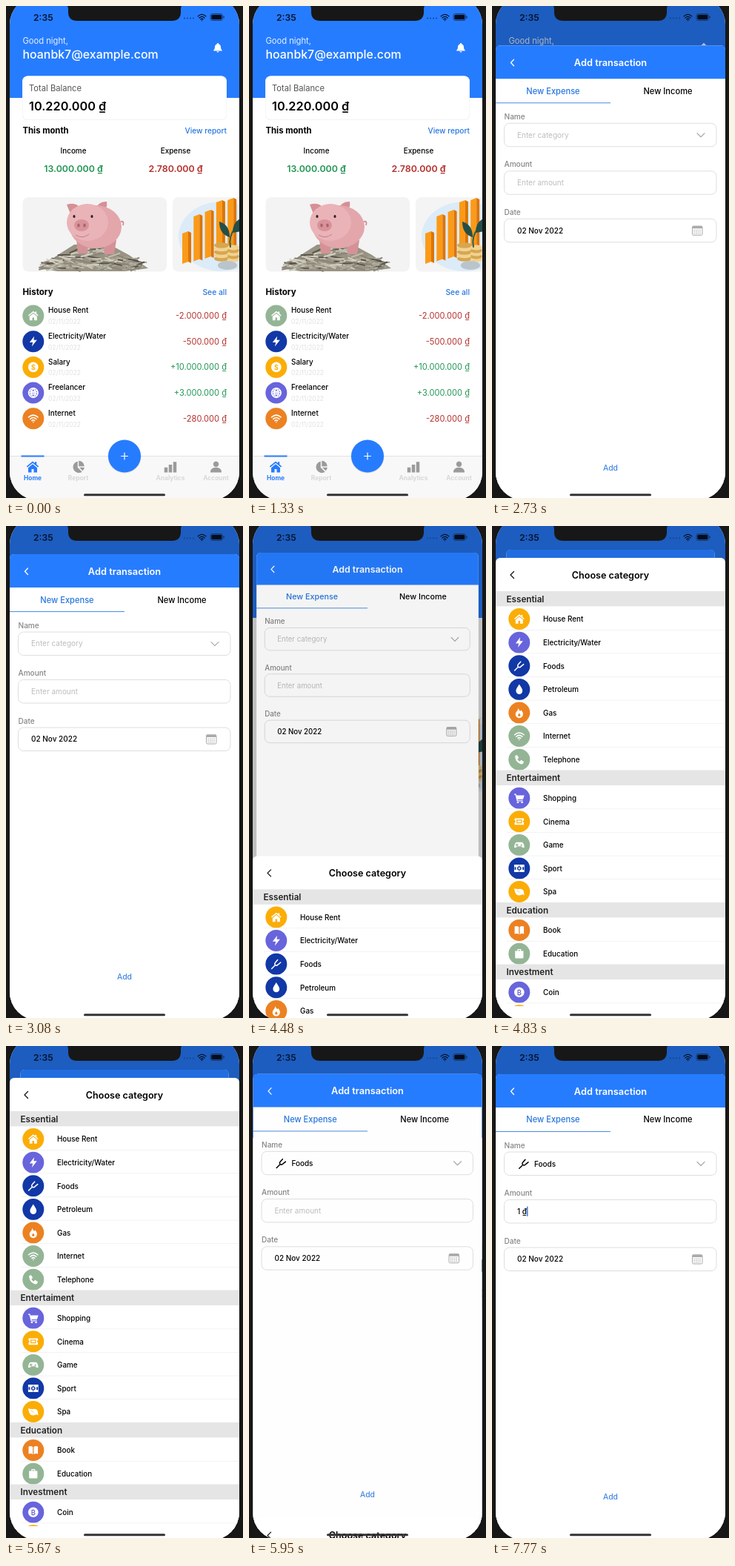
Write an HTML page that moves like this. It is 320 by 664 pixels and loops after 8000 ms.

```html
<!DOCTYPE html>
<html lang="en">
<head>
<meta charset="utf-8">
<style>
  html, body { margin: 0; width: 100%; height: 100%; overflow: hidden; background: #171717; }
  svg { display: block; width: 100vw; height: 100vh; font-family: Inter, Roboto, sans-serif; }
</style>
</head>
<body>
<svg id="stage" viewBox="0 0 320 664"></svg>
<script>
const BLUE = '#267cff', LINK = '#2675df', GREEN = '#219653', RED = '#b3302b';
const SAGE = '#94b595', NAVY = '#1138a6', YELLOW = '#fbad06', VIOLET = '#6864dc', ORANGE = '#ec8122';

// Icons on a 24-unit grid; names in STROKED are drawn as outlines.
const ICONS = {
  house: 'M12 2 1 11l1.500 1.800L12 5l9.500 7.800L23 11l-4-3.300V3h-3v2.200zM12 7 4 13.500V22h6v-6h4v6h6v-8.500z',
  bolt: 'M14 1 4 14h7l-2 9L20 9h-7z',
  fork: 'M2 22 10 14M15 3 10.500 8Q7 12 10 14Q13 16.500 16 13L21.500 8.500',
  drop: 'M12 1C8 8 5 11 5 15.500a7 7 0 0 0 14 0C19 11 16 8 12 1z',
  flame: 'M10 1c1 5 3 5 4 8l2-3c3 4 5 7 4 10a8 7.500 0 0 1-16 0C3 10 10 8 10 1zM12 13c-4 4-3 7 0 7s4-3 0-7z',
  wifi: 'M2 9Q12 0 22 9M5.500 13Q12 7 18.500 13M9 16.500Q12 14 15 16.500M12 19.500v.5',
  phone: 'M3 4 7 2l4 6-3 3q2 4 5 5l3-3 6 4-2 4q-3 3-10-2T3 4z',
  cart: 'M1 3h4l1 3h17l-3 9H8l1 2h11v2H7L3.500 5H1zM7 20h4v3H7zM16 20h4v3h-4z',
  ticket: 'M2 5h20v5a2 2 0 0 0 0 4v5H2v-5a2 2 0 0 0 0-4zM6 8v8h12V8zM8 10h8v4H8z',
  game: 'M6 6h12q4 2 5 10 0 4-5 1l-2-2H8l-2 2q-5 3-5-1Q2 8 6 6zM6 9v2H4v2h2v2h2v-2h2v-2H8V9zM15 11h3v3h-3z',
  sport: 'M1 4h22v16H1zM11.400 5v3a4 4 0 0 0 0 8v3h1.200v-3a4 4 0 0 0 0-8V5zM2 9v6h3V9zM19 9v6h3V9zM10 10h4v4h-4z',
  leaf: 'M1 5q6 2 12 1 9 0 9 8l1 6-3-2Q6 23 3 13q-1-4-2-8zM7 10l9 6-8-7z',
  book: 'M2 4q6-2 9 1v16q-4-3-9-1zM22 4q-6-2-9 1v16q4-3 9-1z',
  bag: 'M3 6h5V2h8v4h5v14q0 2-2 2H5q-2 0-2-2zM10 4v2h4V4z',
  globe: 'M12 2a10 10 0 1 0 .1 0M12 2Q2 12 12 22M12 2Q22 12 12 22M2 12h20M4 7q8 4 16 0M4 17q8-4 16 0',
  bell: 'M12 1q2 0 2 2 5 2 5 8 0 5 3 7v1H2v-1q3-2 3-7 0-6 5-8 0-2 2-2zM9 20h6q-3 5-6 0z',
  pie: 'M11 2v11l8 8A10.500 10.500 0 1 1 11 2zM13 1a10 10 0 0 1 10 10H13zM14 13h9q0 4-3 6z',
  bars: 'M1 13h6v9H1zM9 8h6v14H9zM17 3h6v19h-6z',
  person: 'M12 2a5 5 0 1 0 .1 0zM2 22q0-9 10-9t10 9z'
};
const STROKED = ['fork', 'wifi', 'globe'];

const rect = (x, y, w, h, fill, r = 0, extra = '') =>
  `<rect x="${x}" y="${y}" width="${w}" height="${h}" rx="${r}" fill="${fill}" ${extra}/>`;
const ellipse = (x, y, rx, ry, fill, extra = '') =>
  `<ellipse cx="${x}" cy="${y}" rx="${rx}" ry="${ry}" fill="${fill}" ${extra}/>`;
const path = (d, fill, extra = '') => `<path d="${d}" fill="${fill}" ${extra}/>`;
const line = (d, color, width = 1) =>
  path(d, 'none', `stroke="${color}" stroke-width="${width}" stroke-linecap="round" stroke-linejoin="round"`);
// Text is placed by the vertical centre of its capitals.
const text = (x, y, size, str, fill = '#000', weight = 400, anchor = 'start') =>
  `<text x="${x}" y="${y + size * .36}" font-size="${size}" font-weight="${weight}" fill="${fill}" text-anchor="${anchor}">${str}</text>`;
const group = (id, body) => `<g id="${id}">${body}</g>`;

function icon(name, x, y, size, color) {
  const body = STROKED.includes(name) ? line(ICONS[name], color, 2.4)
    : path(ICONS[name], color, 'fill-rule="evenodd"');
  return `<g transform="translate(${x} ${y}) scale(${size / 24}) translate(-12 -12)">${body}</g>`;
}
function badge(x, y, color, name) {
  const mark = name.length > 1 ? icon(name, x, y, 15, '#fff')
    : ellipse(x, y, 6.8, 6.8, '#fff') + text(x, y, 9.5, name, color, 600, 'middle');
  return ellipse(x, y, 14.5, 14.5, color) + mark;
}

function piggyBank() {
  let seed = 7, notes = '';
  const random = () => (seed = seed * 16807 % 2147483647) / 2147483647;
  const tones = ['#8a8577', '#d3cfc0', '#a9a595', '#57534a', '#c0bcad'];
  for (let i = 0; i < 130; i++) {
    const x = 52 + random() * 130, top = 322 + Math.abs(x - 115) * .36;
    const y = top + random() * (355 - top);
    notes += rect(x - 8, y - 1, 17, 2, tones[i % 5], 0, `transform="rotate(${random() * 50 - 25} ${x} ${y})"`);
  }
  return rect(22.5, 258, 194.5, 100.5, '#f3f3f3', 8) +
    path('M44 354 70 336 92 322H140L166 336 192 354 160 358H70z', '#989383') + notes +
    path('M95 314h16l-1 20H97zM131 316h18l-3 19h-13z', '#d49297') +
    path('M82 268q13-4 18 5l-12 10zM119 276q6-13 17-12 2 9-8 18z', '#d78f96') +
    ellipse(121, 298, 35, 29, '#e2a6ab') + ellipse(110, 292, 28, 25, '#eab3b7') +
    path('M155 291q5-1 3 5', 'none', 'stroke="#d78f96" stroke-width="2"') +
    ellipse(102, 296, 10, 8, '#d8939a') + ellipse(98, 296, 1.7, 2.5, '#a9616a') + ellipse(106, 296, 1.7, 2.5, '#a9616a') +
    ellipse(92, 284, 1.6, 2, '#2b2224') + ellipse(116, 284, 1.6, 2, '#2b2224') +
    path('M94 309q9 6 18-1', 'none', 'stroke="#c07f86"');
}

function growthChart() {
  let out = rect(225, 258, 194, 100.5, '#f4f4f4', 8) + ellipse(291, 311, 58, 47, '#dcebf8');
  // Slanted boxes on a baseline that rises to the right.
  [304, 281, 275, 262, 259].forEach((y, i) => {
    const x = 238 + i * 15.3, base = 347 - i * 3.5;
    out += path(`M${x} ${y + 3}l8-3V${base - 2}l-8 3z`, '#fb9a18') +
      path(`M${x + 8} ${y}l4 2V${base}l-4-2z`, '#dc7406');
  });
  for (let i = 0; i < 5; i++)
    out += ellipse(291, 341 - i * 4.5, 10, 3.8, i % 2 ? '#f1d38f' : '#d7a651') +
      ellipse(307, 342 - i * 4, 8, 3.4, i % 2 ? '#d7a651' : '#f1d38f');
  return out + line('M303 325Q300 311 310 299', '#315e54', 2) +
    path('M302 312q-14-4-14-21 14 4 14 21zM306 306q0-16 13-20v18z', '#244f48') +
    ellipse(299, 350, 13, 6, '#b9c4cb');
}

function home() {
  const history = [
    ['House Rent', '-2.000.000', SAGE, 'house'], ['Electricity/Water', '-500.000', NAVY, 'bolt'],
    ['Salary', '+10.000.000', YELLOW, '$'], ['Freelancer', '+3.000.000', VIOLET, 'globe'],
    ['Internet', '-280.000', ORANGE, 'wifi']];
  const tabs = [['Home', 36, 'house'], ['Report', 97.5, 'pie'], ['Analytics', 222, 'bars'], ['Account', 283.5, 'person']];
  return rect(0, 0, 320, 664, '#fff') + rect(0, 0, 320, 124, BLUE) +
    text(22.5, 47, 11.2, 'Good night,', '#e6f0ff') +
    text(22.5, 65, 15.9, 'hoanbk7@example.com', '#fff', 500) + icon('bell', 286, 56.5, 14, '#fff') +
    rect(22, 94.5, 276, 59.5, '#efefef', 7) + rect(22.5, 94.5, 275, 58.7, '#fff', 7) +
    text(31, 110.5, 11.2, 'Total Balance', '#555') + text(31, 135, 16.3, '10.220.000 ₫', '#000', 600) +
    text(22.5, 168, 11.3, 'This month', '#000', 700) + text(298, 168, 10.2, 'View report', LINK, 500, 'end') +
    text(91, 195, 9.9, 'Income', '#000', 500, 'middle') + text(229, 195, 9.9, 'Expense', '#000', 500, 'middle') +
    text(91, 219.5, 12.4, '13.000.000 ₫', GREEN, 600, 'middle') + text(229, 219.5, 12.4, '2.780.000 ₫', RED, 600, 'middle') +
    piggyBank() + growthChart() +
    text(22.5, 386, 11.5, 'History', '#000', 700) + text(298, 386, 10.3, 'See all', LINK, 500, 'end') +
    history.map(([name, sum, color, mark], i) => {
      const y = 418 + i * 34.7;
      return badge(36.8, y, color, mark) + text(57, y - 7.2, 9.9, name, '#000', 500) +
        text(57, y + 8, 8.4, '02/11/2022', '#e0e0e0') +
        text(298, y, 11.1, sum + ' ₫', sum[0] === '+' ? GREEN : RED, 400, 'end');
    }).join('') +
    rect(0, 607, 320, 57, '#f8f8f8') + rect(0, 607, 320, .7, '#d9d9d9') + rect(20.5, 606.5, 31, 2, BLUE) +
    tabs.map(([name, x, mark], i) => icon(mark, x, 622, 18, i ? '#9b9b9b' : BLUE) +
      text(x, 637, 8.4, name, i ? '#d8d8d8' : BLUE, 700, 'middle')).join('') +
    ellipse(160, 608, 22.5, 22.5, '#000', 'opacity=".12"') + ellipse(160, 607.5, 22, 22, BLUE) +
    line('M155.500 607.500h9M160 603v9', '#fff', 1.2);
}

function addSheet() {
  const field = (label, y) => text(16.5, y - 9, 10.1, label, '#858585', 500) +
    rect(16.5, y, 286.5, 31.5, 'none', 7, 'stroke="#dedede"');
  const hint = (id, y, str) => group(id, text(34, y, 10, str, '#bdbdc0'));
  let dots = '';
  for (let i = 0; i < 12; i++) dots += rect(272.4 + i % 4 * 2.6, 286.6 + Math.floor(i / 4) * 2.3, 1.3, 1.2, '#aaa');
  return rect(5, 38, 310, 640, '#fff', 6) +
    path('M5 83V44q0-6 6-6H309q6 0 6 6V83z', BLUE) + line('M29.500 57 25.500 61.200 29.500 65.500', '#fff', 1.3) +
    text(160, 61, 12.8, 'Add transaction', '#fff', 600, 'middle') +
    text(82.5, 99.5, 11.1, 'New Expense', LINK, 500, 'middle') + text(237.5, 99.5, 11.1, 'New Income', '#000', 500, 'middle') +
    rect(5, 115, 155, 1, '#4b8be0') +
    field('Name', 143) + field('Amount', 207.5) + field('Date', 272) +
    hint('nameHint', 158.8, 'Enter category') +
    group('nameValue', icon('fork', 43, 159, 15, '#000') + text(57, 159, 10, 'Foods', '#000', 500)) +
    line('M277 156.500 282 161.500 287 156.500', '#aaa', 1.2) +
    hint('amountHint', 223.3, 'Enter amount') + group('amountValue', text(34, 223.3, 10, '1 ₫', '#000', 500)) +
    rect(0, 216.5, 1.5, 13.5, '#3f7de6', .7, 'id="caret"') +
    text(34, 287.8, 10, '02 Nov 2022', '#000', 500) +
    rect(270.5, 282, 13.5, 12, 'none', 1.5, 'stroke="#aaa"') + rect(270.5, 281.5, 13.5, 3.5, '#aaa', 1) + dots +
    text(160, 608, 10.5, 'Add', LINK, 400, 'middle') +
    rect(5, 38, 310, 640, '#000', 6, 'id="addDim"');
}

function categorySheet() {
  const sections = [
    ['Essential', [['House Rent', YELLOW, 'house'], ['Electricity/Water', VIOLET, 'bolt'], ['Foods', NAVY, 'fork'],
      ['Petroleum', NAVY, 'drop'], ['Gas', ORANGE, 'flame'], ['Internet', SAGE, 'wifi'], ['Telephone', SAGE, 'phone']]],
    ['Entertaiment', [['Shopping', VIOLET, 'cart'], ['Cinema', YELLOW, 'ticket'], ['Game', SAGE, 'game'],
      ['Sport', NAVY, 'sport'], ['Spa', YELLOW, 'leaf']]],
    ['Education', [['Book', ORANGE, 'book'], ['Education', SAGE, 'bag']]],
    ['Investment', [['Coin', VIOLET, '₿'], ['', YELLOW, 'bars']]]];
  let y = 88, out = rect(5, 43, 310, 640, '#fff', 6) + line('M29.500 61.500 25 66 29.500 70.500', '#111', 1.3) +
    text(160, 66, 12.6, 'Choose category', '#000', 600, 'middle');
  for (const [title, rows] of sections) {
    out += rect(5, y, 310, 20.4, '#e5e5e5') + text(19.5, y + 10.6, 11.7, title, '#222', 600);
    y += 20.4;
    for (const [name, color, mark] of rows) {
      out += badge(36.8, y + 17.2, color, mark) + text(69, y + 17.5, 9.9, name, '#000', 500);
      y += 31.6;
      out += rect(20, y, 295, .6, '#ececec');
    }
  }
  // The list stops above the home indicator.
  return out + rect(5, 648, 310, 40, '#fff');
}

const statusBar = text(37, 15.3, 12.2, '2:35', '#081530', 600) +
  [241, 245, 249, 253].map(x => ellipse(x, 16.5, 1, 1, '#17458c')).join('') +
  icon('wifi', 264.5, 15.5, 13, '#050d1c') +
  rect(276, 10.5, 16.5, 9, 'none', 2.5, 'stroke="#12305f" stroke-width=".8"') +
  rect(277.3, 11.8, 14, 6.4, '#050d1c', 1.5) + rect(293.5, 13.5, 1.2, 3, '#12305f', .5) +
  path('M78-2q6 0 6 6v4q0 12 12 12H224q12 0 12-12V4q0-6 6-6z', '#171717') +
  rect(105, 658.3, 110, 3, '#333', 1.5);

document.getElementById('stage').innerHTML =
  `<clipPath id="screen">${rect(5, -13, 310, 680, '#000', 38)}</clipPath>` + rect(0, 0, 320, 664, '#171717') +
  `<g clip-path="url(#screen)">${home()}${rect(0, 0, 320, 664, '#000', 0, 'id="homeDim" opacity=".25"')}` +
  `${group('add', addSheet())}${group('list', categorySheet())}${statusBar}</g>`;

const el = id => document.getElementById(id);
const show = (id, on) => el(id).setAttribute('visibility', on ? 'visible' : 'hidden');
const set = (id, name, value) => el(id).setAttribute(name, value);
const ramp = (t, from, to) => Math.min(1, Math.max(0, (t - from) / (to - from)));
// Remaining distance of a critically damped spring.
const spring = ms => { const a = Math.max(0, ms) * .0183; return (1 + a) * Math.exp(-a); };

function draw(time) {
  const t = Math.floor(time / 70 + 1e-6) * 70;
  const opened = t >= 2730, picked = t >= 5670, typed = t >= 7630;
  const u = ramp(t, 4340, 4690);
  const cover = picked ? spring(t - 5680) : u * u * (3 - 2 * u);

  show('homeDim', opened);
  show('add', opened);
  const drop = 626 * spring(t - 2424);
  set('add', 'transform', `translate(160 ${38 - 6 * cover + drop}) scale(${1 - .094 * cover}) translate(-160 -38)`);
  set('addDim', 'opacity', .12 * cover);
  show('list', cover > .0005);
  set('list', 'transform', `translate(0 ${621 * (1 - cover)})`);

  // Children inherit visibility from the sheet, so use opacity inside it.
  set('nameHint', 'opacity', +!picked);
  set('nameValue', 'opacity', +picked);
  set('amountHint', 'opacity', +!typed);
  set('amountValue', 'opacity', +typed);
  set('caret', 'x', typed ? 47 : 33.5);
  set('caret', 'opacity', typed ? 1 : ramp(t, 6440, 6790) - ramp(t, 7140, 7490));
}

function tick() {
  draw(performance.now() % 8000);
  requestAnimationFrame(tick);
}
tick();
</script>
</body>
</html>
```
